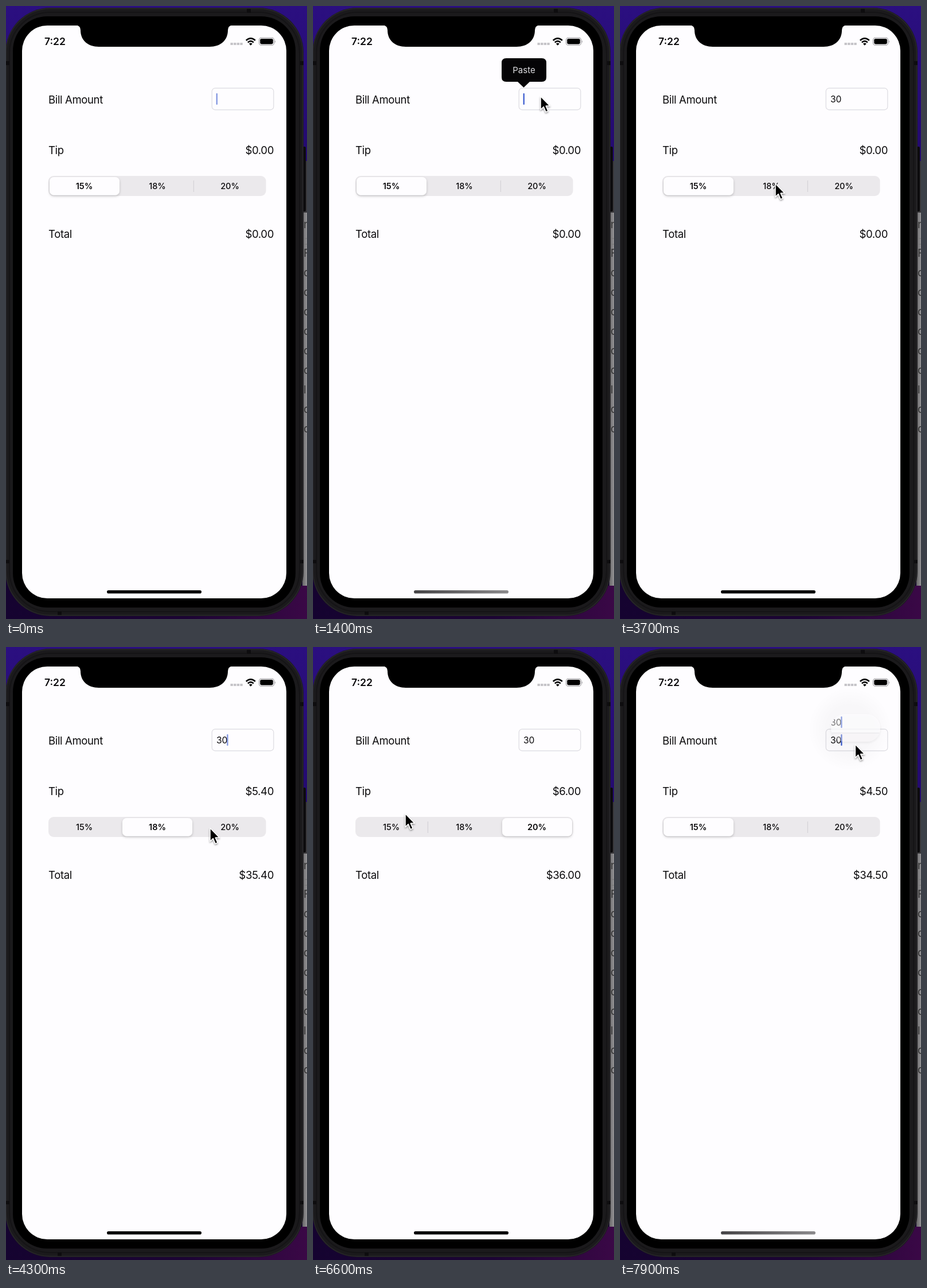
Recreate the animation shown at these times as an HTML page. Size 525 by 1068 pixels, loop 8000 ms.

```html
<!DOCTYPE html>
<html lang="en">
<head>
<meta charset="utf-8">
<title>Tip calculator</title>
<style>
  html, body { margin: 0; width: 100%; height: 100%; overflow: hidden; background: #1b0a45; }
  svg { display: block; width: 525px; height: 1068px; }
  text { font-family: Inter, Roboto, sans-serif; fill: #0b0a0c; }
  .label { font-size: 18.5px; letter-spacing: -.35px; }
  .amount { text-anchor: end; }
  .segment { font-size: 14.5px; font-weight: 500; text-anchor: middle; }
  .selected { font-weight: 600; }
  .input { font-size: 15.6px; letter-spacing: -.2px; }
</style>
</head>
<body>
<svg viewBox="0 0 525 1068">
  <defs>
    <linearGradient id="wall" x2="0" y2="1">
      <stop stop-color="#2b0f80"/><stop offset=".3" stop-color="#22096c"/><stop offset="1" stop-color="#150330"/>
    </linearGradient>
    <linearGradient id="floor">
      <stop stop-color="#150330"/><stop offset=".6" stop-color="#1c0434"/><stop offset="1" stop-color="#3a0846"/>
    </linearGradient>
    <linearGradient id="pane"><stop stop-color="#656466"/><stop offset="1" stop-color="#969597"/></linearGradient>
    <linearGradient id="dimBar"><stop stop-color="#454446"/><stop offset="1" stop-color="#8b8a8c"/></linearGradient>
    <radialGradient id="halo">
      <stop offset=".55" stop-color="#000" stop-opacity=".025"/><stop offset="1" stop-color="#000" stop-opacity="0"/>
    </radialGradient>
    <filter id="soft" x="-30%" y="-30%" width="160%" height="180%">
      <feDropShadow dx="0" dy="2" stdDeviation="2" flood-opacity=".2"/>
    </filter>
    <filter id="arrowShadow" x="-50%" y="-50%" width="200%" height="200%">
      <feDropShadow dx="0" dy="2" stdDeviation="1.6" flood-opacity=".4"/>
    </filter>
    <clipPath id="lens"><rect x="368" y="117" width="86" height="48" rx="24"/></clipPath>
  </defs>

  <!-- desktop -->
  <rect width="525" height="1068" fill="url(#wall)"/>
  <rect y="1010" width="525" height="58" fill="url(#floor)"/>
  <rect x="517" y="270" width="8" height="740" fill="url(#pane)"/>
  <rect x="517" y="270" width="8" height="90" fill="#39383b"/>
  <path d="M517 405H525M517 415H525" stroke="#777" />
  <g id="fragments" font-size="19" style="fill:#333"></g>

  <!-- phone -->
  <rect x="518" y="245" width="5" height="113" rx="2" fill="#0c0b0d"/>
  <rect x="-1" y="3" width="520" height="1060" rx="78" fill="#1b1a1c"/>
  <rect x="0" y="4.5" width="517.5" height="1057" rx="77" fill="none" stroke="#29282b" stroke-width="1.5"/>
  <rect x="6" y="11" width="506" height="1044" rx="71" fill="none" stroke="#151416" stroke-width="2"/>
  <path d="M0 96H6V103H0M0 965H6V971H0M420 5H427V12H420M90 1055H97V1061H90M513 96H519V103H513M513 965H519V971H513" fill="#0e0d0f"/>
  <rect x="12" y="18" width="493" height="1030" rx="60" fill="#000"/>
  <rect x="28" y="34" width="461" height="998" rx="44" fill="#fefdff"/>
  <path d="M122 33.5Q130 34 130 42C130 60 143 71 162 71H355C374 71 387 60 387 42Q387 34 395 33.5Z" fill="#000"/>

  <!-- status bar -->
  <text x="67" y="68" font-size="17.5" font-weight="600">7:22</text>
  <path d="M391.5 66H413" stroke="#c5c4c8" stroke-width="4.2" stroke-dasharray="4.4 1.2"/>
  <g fill="none" stroke="#050506" stroke-width="2.6">
    <path d="M418.8 60Q426.8 52.8 434.8 60"/>
    <path d="M421.8 63.4Q426.8 59 431.8 63.4"/>
  </g>
  <path d="M423.9 65.7Q426.8 63.5 429.7 65.7L426.8 68.8Z"/>
  <rect x="441.5" y="55.2" width="26" height="13" rx="3.8" fill="none" stroke="#98979b" stroke-width="1.1"/>
  <rect x="443.2" y="56.9" width="22.6" height="9.6" rx="2.4"/>
  <path d="M469 59.5Q471 62 469 64.3Z" fill="#98979b"/>

  <!-- form -->
  <text class="label" x="74" y="169.5">Bill Amount</text>
  <text class="label" x="74" y="257.5">Tip</text>
  <text class="label" x="74" y="403.5">Total</text>
  <text class="label amount" id="tip" x="467" y="257.5"></text>
  <text class="label amount" id="total" x="467" y="403.5"></text>

  <rect x="74" y="296" width="379.5" height="35" rx="9" fill="#ebe9ec"/>
  <path id="dividerLeft" d="M200.3 304V324" stroke="#cfcdd2"/>
  <path id="dividerRight" d="M327.3 304V324" stroke="#cfcdd2"/>
  <rect id="thumb" x="76" y="298" width="122" height="31.5" rx="7.5" fill="#fefdff" filter="url(#soft)"/>
  <text class="segment" x="136.5" y="319">15%</text>
  <text class="segment" x="264" y="319">18%</text>
  <text class="segment" x="390.5" y="319">20%</text>

  <g id="field">
    <rect x="359.2" y="143.2" width="107.6" height="37.6" rx="5.5" fill="#fefdff" stroke="#dcdbe1" stroke-width="1.2"/>
    <text class="input" id="bill" x="367" y="168"></text>
    <rect id="caret" y="152" width="2.3" height="20" rx="1" fill="#3f5fd0"/>
  </g>

  <g id="loupe">
    <circle cx="401" cy="143" r="73" fill="url(#halo)"/>
    <rect x="368" y="117" width="86" height="48" rx="24" fill="#fefdff" fill-opacity=".42" filter="url(#soft)" opacity=".75"/>
    <g clip-path="url(#lens)"><use href="#field" y="-31" opacity=".55"/></g>
  </g>

  <g id="popover">
    <path d="M337 91H399Q407 91 407 99V124Q407 132 399 132H378L367.5 142L357 132H337Q329 132 329 124V99Q329 91 337 91Z" fill="#050406"/>
    <text x="368" y="117" font-size="15" text-anchor="middle" style="fill:#dddce0">Paste</text>
  </g>

  <rect id="homeBar" x="176" y="1018" width="165" height="5.6" rx="2.8"/>

  <path id="pointer" d="M1 1.5V24.5L6.2 19.6L10 28.6L14 26.9L10.2 18.1H17.3Z" fill="#000" stroke="#fff" stroke-width="1.5" stroke-linejoin="round" filter="url(#arrowShadow)"/>
</svg>

<script>
const LOOP = 8000, STEP = 100;
const $ = id => document.getElementById(id);
const clamp = v => Math.min(1, Math.max(0, v));
const ramp = (t, from, to) => clamp((t - from) / (to - from));
const ease = p => p * p * (3 - 2 * p);

// [time, x, y] of the pointer tip
const pointerPath = [
  [0, 545, 310], [100, 508, 302], [200, 480, 205], [300, 436, 112], [400, 412, 102],
  [500, 400, 138], [600, 396, 156], [3200, 396, 156], [3500, 320, 270], [3700, 270, 308],
  [3900, 270, 310], [4100, 302, 313], [4300, 355, 314], [4600, 371, 305], [4800, 367, 302],
  [5600, 367, 302], [5800, 345, 302], [6100, 240, 296], [6400, 174, 289], [6600, 160, 289],
  [6900, 141, 306], [7100, 141, 307], [7300, 220, 260], [7500, 350, 192], [7700, 408, 169], [8000, 410, 168]
];

// [time, selected segment, tip, total]
const taps = [
  [0, 0, '$0.00', '$0.00'],
  [3800, 1, '$5.40', '$35.40'],
  [4700, 2, '$6.00', '$36.00'],
  [7000, 0, '$4.50', '$34.50']
];

const segments = document.querySelectorAll('.segment');
const thumbShift = index => index * 127;

[['n', 387], ['F', 437], ['c', 471], ['c', 505], ['c', 539], ['c', 573],
 ['c', 607], ['c', 641], ['l', 675], ['c', 709], ['c', 743]].forEach(([char, y]) => {
  const text = document.createElementNS('http://www.w3.org/2000/svg', 'text');
  text.setAttribute('x', 519);
  text.setAttribute('y', y);
  text.style.fill = '#333';
  text.textContent = char;
  $('fragments').append(text);
});

function pointerAt(t) {
  const i = Math.max(1, pointerPath.findIndex(p => p[0] >= t));
  const [t0, x0, y0] = pointerPath[i - 1], [t1, x1, y1] = pointerPath[i];
  const p = ramp(t, t0, t1);
  return [x0 + (x1 - x0) * p, y0 + (y1 - y0) * p];
}

function caretOpacity(t) {
  const touched = t >= 1000 && t < 1700, typing = t >= 2300 && t < 2700;
  if (touched || typing || t >= 7700) return 1;
  const fadeStart = t < 1000 ? 0 : t < 2300 ? 1700 : t < 3600 ? 2700 : 3300;
  const phase = (t - fadeStart) % 1000;
  return phase < 200 ? .65 - phase * .0035 : phase < 600 ? 0 : 1;
}

function draw(t) {
  const current = taps.findLastIndex(tap => t >= tap[0]);
  const [tapTime, index, tip, total] = taps[current];
  const previous = taps[Math.max(0, current - 1)][1];
  const slide = ease(ramp(t, tapTime, tapTime + 300));
  const shift = thumbShift(previous) + (thumbShift(index) - thumbShift(previous)) * slide;

  $('tip').textContent = tip;
  $('total').textContent = total;
  $('thumb').setAttribute('transform', `translate(${shift})`);
  segments.forEach((label, i) => label.classList.toggle('selected', i === index));
  $('dividerLeft').style.opacity = index === 2 ? slide : 0;
  $('dividerRight').style.opacity = index === 0 ? (current ? slide : 1) : 0;

  const bill = t < 2300 ? '' : t < 2400 ? '3' : '30';
  $('bill').textContent = bill;
  $('caret').setAttribute('x', [366.6, 376, 385.2][bill.length]);
  $('caret').style.opacity = caretOpacity(t);

  $('popover').style.opacity = ramp(t, 1000, 1200) * (1 - ramp(t, 1800, 2100));
  $('loupe').style.opacity = ramp(t, 7700, 7900);
  const dimmed = (t >= 1100 && t < 1900) || t >= 7800;
  $('homeBar').setAttribute('fill', dimmed ? 'url(#dimBar)' : '#000');
  $('pointer').setAttribute('transform', `translate(${pointerAt(t)})`);
}

function tick() {
  const t = performance.now() % LOOP;
  draw(Math.floor(t / STEP) * STEP);
  requestAnimationFrame(tick);
}
tick();
</script>
</body>
</html>
```
